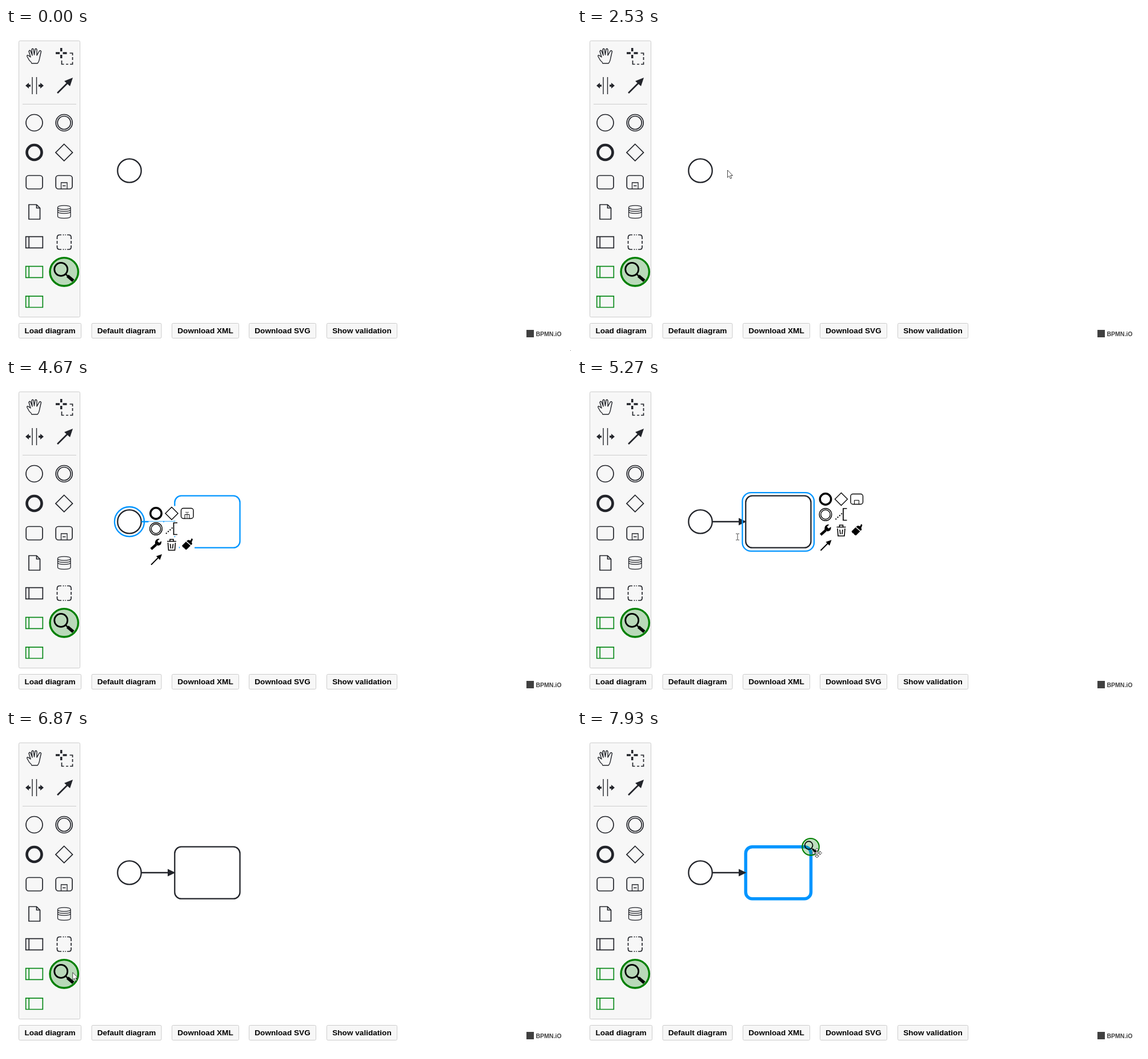
An HTML page for the animation above (8000 ms loop, 989 by 566 pixels).

```html
<!DOCTYPE html>
<html lang="en">
<head>
<meta charset="utf-8">
<title>Process modeler</title>
<style>
  html, body { margin: 0; height: 100%; overflow: hidden; background: #fff; }
  svg { display: block; width: 989px; height: 566px; }
  text { font: bold 13.6px "Liberation Sans", Arial, sans-serif; text-anchor: middle; }
  .icon { fill: none; stroke: #22242a; stroke-width: 1.7; }
  .solid { fill: #22242a; stroke: none; }
  .green { stroke: #0a8a1a; }
  .shape { fill: #fff; stroke: #22242a; stroke-width: 2.3; }
  .blue { fill: none; stroke: #0095ff; stroke-width: 2.3; }
  .panel { fill: #f7f7f7; stroke: #ccc; }
  .pad { fill: none; stroke: #000; stroke-width: 1.4; }
  .black { fill: #000; stroke: none; }
  .cursor { fill: #fff; stroke: #333; stroke-width: .9; }
</style>
</head>
<body>
<svg viewBox="0 0 989 566">
  <defs>
    <g id="lens">
      <circle r="24.7" fill="#008000" fill-opacity=".25" stroke="#008000" stroke-width="3.4"/>
      <g fill="none" stroke="#000">
        <circle cx="-5.5" cy="-4.5" r="11.5" stroke-width="2.8"/>
        <path d="M3 4l4 4" stroke-width="2.5"/>
        <path d="M6 7l10 8.5" stroke-width="5.5"/>
      </g>
    </g>
    <g id="pool"><path d="M-14.8-9.8h29.6v19.6h-29.6zM-9.3-9.8v19.6"/></g>
    <g id="pad" class="pad">
      <g id="tiles" fill="#fff" stroke="none"></g>
      <circle cx="262.5" cy="235.5" r="9.7" stroke-width="3.5"/>
      <path d="M290 224.5l11 11-11 11-11-11z"/>
      <rect x="306.5" y="226.5" width="21.5" height="18" rx="4"/>
      <path d="M313 244.500v-7h8v7" stroke-width="1"/>
      <circle cx="262.500" cy="262.500" r="10.800"/><circle cx="262.500" cy="262.500" r="8.200"/>
      <path d="M300 252h-6.500v20.500h6.500" stroke-width="1.700"/>
      <path d="M280 271l12-11" stroke-width="2" stroke-dasharray="2 2.500"/>
      <path d="M254 298l9-8" stroke-width="4.500"/>
      <path class="black" d="M261 289q-1-7 5-9l3 0-4 4 3 3 4-3q1 7-6 8z"/>
      <path d="M282 284.500h16M287 284v-3h6v3M283.500 287l1 13h11l1-13M287.500 289l1 8M292.500 289l-1 8" stroke-width="1.600"/>
      <path class="black" d="M308 292l7-7 8 7-7 7q-3 0-4-3-3-1-4-4zM316 284l3-2 4 1 2-4 2 2-2 5 1 3-2 2z"/>
      <path d="M254 325.500l13-13" stroke-width="1.900"/>
      <path class="black" d="M273 307l-3.500 10-6.500-6.500z"/>
    </g>
  </defs>

  <rect id="canvas" width="989" height="566" fill="#fff"/>

  <circle class="shape" cx="216" cy="250" r="20.7"/>
  <g id="task">
    <rect id="taskBox" class="shape" x="295.3" y="204.700" width="114.200" height="91" rx="11.500"/>
    <path d="M237 250h48" stroke="#22242a" stroke-width="2.300"/>
    <path class="solid" d="M283 243.500l13.500 6.500-13.500 6.500z"/>
  </g>
  <g id="preview" class="blue">
    <path d="M237 250h58"/>
    <rect x="295.300" y="204.700" width="114.200" height="91" rx="11.500"/>
  </g>
  <circle id="eventRing" class="blue" cx="216" cy="250" r="26"/>
  <rect id="taskRing" class="blue" x="289.500" y="199.200" width="125.500" height="102.500" rx="15"/>
  <use id="eventPad" href="#pad"/>
  <use id="taskPad" href="#pad" x="172.500" y="-25"/>

  <rect class="panel" x="22.500" y="22.500" width="107" height="484" rx="2"/>
  <path d="M29 133.500h94" stroke="#ccc"/>
  <g class="icon">
    <path stroke-width="1.400" stroke-linejoin="round" d="M41 57L37 50Q36 47 39 48L43 51 40 41Q41 38 43 40L46 48 45 38Q46 35 48 37L49.500 47 51 37Q53 35 54 38L54 48 58 41Q60 38 61.500 41L59 52Q58 59 55 62H45Q44 59 41 57Z"/>
    <path stroke-width="3.500" d="M87 44h7M99.500 44h7M96.700 35v6M96.700 47v6"/>
    <path d="M97.500 57v6.500h4M105 63.500h4M112 63.500h4.500v-4M116.500 56v-5M116.500 48v-4h-5"/>
    <path stroke-width="1.400" d="M46 86v30M53.500 86v30"/>
    <path class="solid" d="M34 101l6-5v3.200h3v3.600h-3v3.200zM66 101l-6-5v3.200h-3v3.600h3v3.200z"/>
    <path stroke-width="2.600" d="M90 114l18-18"/>
    <path class="solid" d="M117 87l-5 15-10-9z"/>
    <circle cx="49.500" cy="166" r="14.500"/>
    <circle cx="101.700" cy="166" r="14.500"/><circle cx="101.700" cy="166" r="11.500"/>
    <circle cx="49.500" cy="218" r="13" stroke-width="4.700"/>
    <path d="M101.700 203.500l14.800 14.700-14.800 14.700-14.800-14.700z"/>
    <rect x="35.200" y="258.500" width="28.800" height="23.500" rx="4.500"/>
    <rect x="87.200" y="258.500" width="28.800" height="23.500" rx="4.500"/>
    <path stroke-width="1.300" d="M96.500 282v-11h10.500v11M99 276.500h5.500"/>
    <path d="M40 309.500h13.500l6 6v19.500h-19.500zM53.500 309.500v6h6"/>
    <path stroke-width="1.300" d="M90.500 314.500v15.500c0 4.500 22.500 4.500 22.500 0v-15.500c0-4.500-22.500-4.500-22.500 0s22.500 4.500 22.500 0M90.500 318c0 4.500 22.500 4.500 22.500 0M90.500 321.500c0 4.500 22.500 4.500 22.500 0"/>
    <use href="#pool" x="49.500" y="375.500"/>
    <path d="M89.500 370v-3q0-4.500 4.500-4.500h3M107 362.500h3q4 0 4 4.500v3M114 381v3q0 4-4 4h-3M97 388h-3q-4.500 0-4.500-4v-3M99.500 362.500h2M103.500 362.500h1.500M99.500 388h2M103.500 388h1.500M89.500 373v5M114 373v5"/>
    <use class="green" href="#pool" x="49.500" y="427.500"/>
    <use class="green" href="#pool" x="49.500" y="479.700"/>
  </g>
  <use href="#lens" x="101.700" y="427.300"/>

  <g id="buttons"></g>
  <rect x="911" y="529" width="13" height="13" fill="#404040"/>
  <text x="950" y="539.500" fill="#404040" style="font-size:10.500px">BPMN.iO</text>

  <use id="drag" href="#lens"/>
  <g id="pointer" class="cursor">
    <path id="arrow" d="M.5.5V13.500L3.500 10.700 5.500 15.500 7.700 14.500 5.700 10H9.500Z"/>
    <path id="move" d="M0-8.500L3.500-5H1V-1H5V-3.500L8.500 0 5 3.500V1H1V5H3.500L0 8.500-3.500 5H-1V1H-5V3.500L-8.500 0-5-3.500V-1H-1V-5H-3.500Z"/>
    <path id="beam" fill="none" d="M-3-5.500h2.500l.5.500.5-.5h2.500M0-5v10M-3 5.500h2.500l.5-.5.5.5h2.500"/>
  </g>
</svg>
<script>
const $ = id => document.getElementById(id);
const FPS = 15, FRAMES = 120;

$('buttons').innerHTML = [
  ['Load diagram', 22.5, 109], ['Default diagram', 150, 122], ['Download XML', 290.5, 117],
  ['Download SVG', 425.5, 117], ['Show validation', 561.5, 123]
].map(([label, x, w]) =>
  `<rect class="panel" x="${x}" y="517.5" width="${w}" height="26" rx="2"/>
   <text x="${x + w / 2}" y="535.3">${label}</text>`).join('');

for (let i = 0; i < 10; i++) {
  const row = Math.floor(i / 3), col = i % 3;
  $('tiles').innerHTML +=
    `<rect x="${249.5 + col * 27.3}" y="${222.5 + row * 27.2}" width="26" height="26"/>`;
}

// [frame, x, y, eased]
const pointerPath = [
  [0, 988, 565], [9, 639, 378, 1], [14, 639, 378], [15, 634, 375.5], [17, 613, 367],
  [18, 613, 367], [20, 610, 366], [27, 610, 366], [38, 263, 248.5, 1], [40, 230, 243],
  [43, 211, 246], [55, 211, 246], [59, 258, 230], [63, 317, 239], [76, 317, 239],
  [81, 261.5, 297, 1], [94, 261.5, 297], [104, 112, 428, 1], [108, 112, 428],
  [113, 333, 295.5, 1], [116, 388, 264], [119, 420, 215.5]
];
const dragPath = [
  [109, 115, 425], [113, 318, 306.500, 1], [115, 365, 295.500],
  [117, 409, 250], [119, 409, 204.800]
];

function along(path, frame) {
  const i = path.findIndex(key => key[0] >= frame);
  if (i < 1) return path[0].slice(1, 3);
  const [f0, x0, y0] = path[i - 1], [f1, x1, y1, eased] = path[i];
  let p = (frame - f0) / (f1 - f0);
  if (eased) p = p * p * (3 - 2 * p);
  return [x0 + (x1 - x0) * p, y0 + (y1 - y0) * p];
}

const show = (id, on) => { $(id).style.display = on ? '' : 'none'; };
const place = (id, [x, y], scale = 1) =>
  $(id).setAttribute('transform', `translate(${x} ${y}) scale(${scale})`);

function draw(frame) {
  const between = (from, to) => frame >= from && frame < to;
  const moving = between(40, 57) || frame >= 110, typing = between(70, 80);
  const hovered = frame >= 114;

  show('eventRing', between(51, 71));
  show('eventPad', between(51, 71));
  show('preview', between(66, 71));
  show('task', frame >= 71);
  show('taskRing', between(71, 85));
  show('taskPad', between(71, 85));

  $('canvas').setAttribute('fill', between(110, 114) ? '#ffefee' : '#fff');
  $('taskBox').style.stroke = hovered ? '#0095ff' : '';
  $('taskBox').style.strokeWidth = hovered ? 5.5 : '';

  show('drag', frame >= 110);
  place('drag', along(dragPath, frame), .6);
  place('pointer', along(pointerPath, frame));
  show('move', moving);
  show('beam', typing);
  show('arrow', !moving && !typing);
}

const start = performance.now();
function tick() {
  const ms = performance.now() - start;
  draw(Math.floor(ms * FPS / 1000 + .1) % FRAMES);
  requestAnimationFrame(tick);
}
tick();
</script>
</body>
</html>
```
